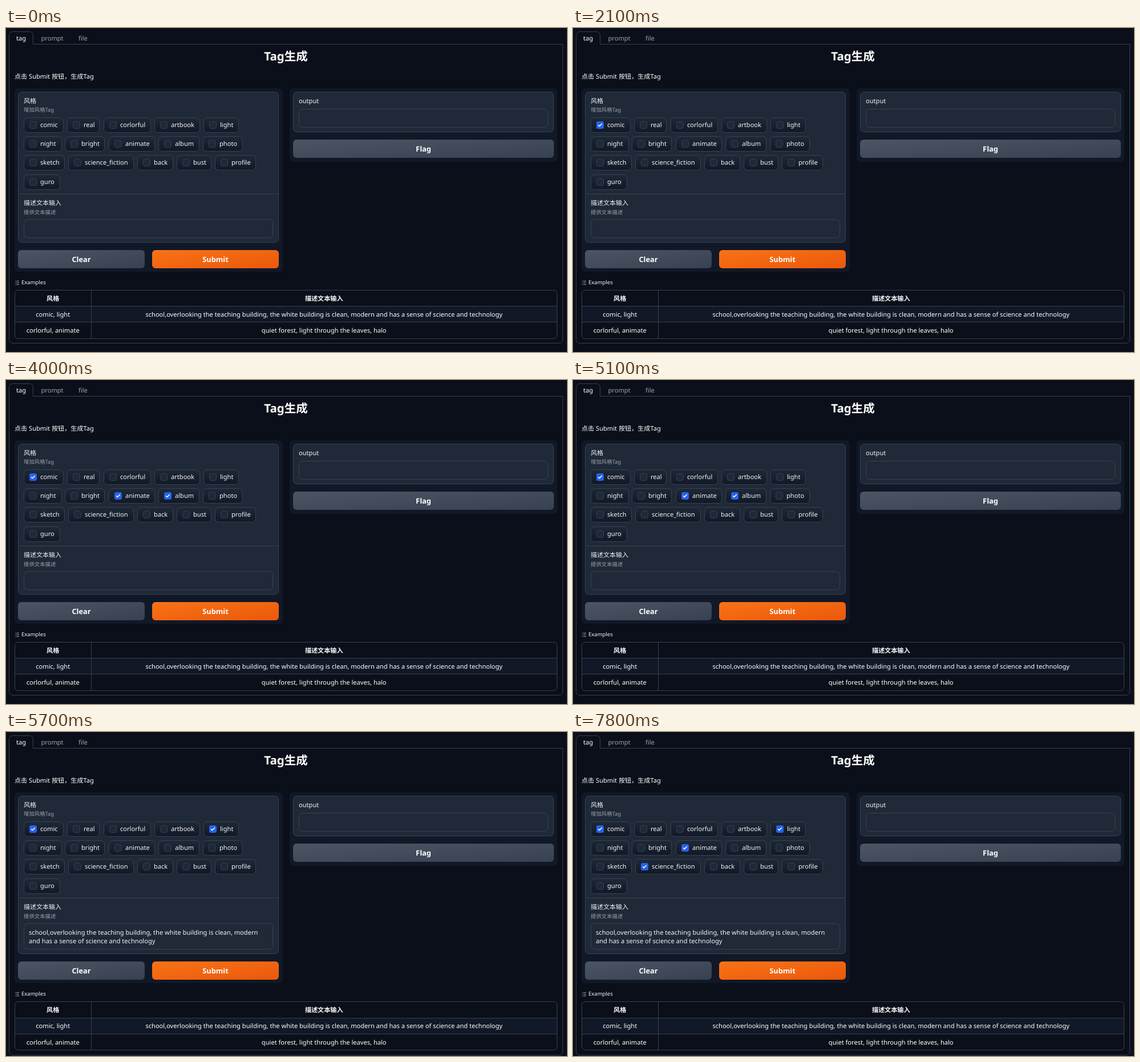
An HTML page with a canvas that plays this animation: 983x569 px, repeating every 8 s.

```html
<!DOCTYPE html>
<html lang="zh-CN">
<head>
<meta charset="utf-8">
<title>Tag生成</title>
<style>
html, body { margin: 0; width: 100%; height: 100%; overflow: hidden; background: #0b0f19; }
canvas { display: block; }
</style>
</head>
<body>
<canvas id="stage" width="983" height="569"></canvas>
<script>
const ctx = document.getElementById('stage').getContext('2d');
const LOOP = 8000;
const FAMILY = '"Noto Sans", "Noto Sans CJK SC", "Noto Sans CJK", sans-serif';
const BG = '#0b0f19', PANEL = '#111827', BLOCK = '#1f2937', LINE = '#374151';
const HOVER = '#4b5563', BLUE = '#2563eb', FOCUS = '#3b82f6';
const ORANGE = '#f97316', RUST = '#ea580c';
const WHITE = '#ffffff', TEXT = '#f3f4f6', MUTED = '#9ca3af';
const BODY = 11.1, SMALL = 9.4;
const SCENE1 = 'school,overlooking the teaching building, the white building is clean, modern';
const SCENE2 = 'and has a sense of science and technology';

// rows of [label, box x, chip width]
const CHIPS = [
  [['comic', 41, 70], ['real', 117, 57], ['corlorful', 181, 83], ['artbook', 270, 80], ['light', 356, 62]],
  [['night', 41, 67], ['bright', 113, 70], ['animate', 190, 81], ['album', 277, 72], ['photo', 355, 70]],
  [['sketch', 41, 72], ['science_fiction', 119, 115], ['back', 240, 63], ['bust', 309, 61], ['profile', 376, 72]],
  [['guro', 41, 64]]
];

// [time, label, box state]
const EVENTS = [
  [1200, 'corlorful', 'hover'], [1400, 'corlorful', ''], [1400, 'comic', 'hover'], [2100, 'comic', 'on'],
  [2300, 'real', 'hover'], [2400, 'real', ''], [2500, 'animate', 'hover'],
  [2900, 'animate', 'focus'], [3000, 'animate', 'on'],
  [3500, 'album', 'hover'], [4000, 'album', 'on'],
  [5700, 'animate', ''], [5700, 'album', ''], [5700, 'light', 'on'],
  [6100, 'animate', 'hover'], [6200, 'animate', ''],
  [6400, 'corlorful', 'hover'], [6500, 'corlorful', ''], [6500, 'animate', 'hover'],
  [7000, 'animate', 'on'], [7800, 'science_fiction', 'on']
];

function boxStates(t) {
  const states = {};
  for (const [at, label, state] of EVENTS) if (t >= at) states[label] = state;
  return states;
}

function text(str, x, y, { size = BODY, color = TEXT, weight = 400, align = 'left' } = {}) {
  ctx.font = `${weight} ${size}px ${FAMILY}`;
  ctx.textRendering = 'geometricPrecision';
  ctx.textAlign = align;
  ctx.fillStyle = color;
  ctx.fillText(str, x, y);
}

function fillBox(x, y, w, h, r, fill) {
  ctx.beginPath();
  ctx.roundRect(x, y, w, h, r);
  ctx.fillStyle = fill;
  ctx.fill();
}

// box with a one pixel border inside its edge
function frame(x, y, w, h, r, fill, stroke = LINE) {
  ctx.beginPath();
  ctx.roundRect(x + 0.5, y + 0.5, w - 1, h - 1, r);
  if (fill) {
    ctx.fillStyle = fill;
    ctx.fill();
  }
  ctx.strokeStyle = stroke;
  ctx.lineWidth = 1;
  ctx.stroke();
}

function rect(x, y, w, h, fill = LINE) {
  ctx.fillStyle = fill;
  ctx.fillRect(x, y, w, h);
}

// corner-to-corner gradient, like "to bottom right" in CSS
function diagonal(x, y, w, h, from, to) {
  const k = w * h / (w * w + h * h), cx = x + w / 2, cy = y + h / 2;
  const g = ctx.createLinearGradient(cx - h * k, cy - w * k, cx + h * k, cy + w * k);
  g.addColorStop(0, from);
  g.addColorStop(1, to);
  return g;
}

function button(label, x, y, w, from, to) {
  const h = 32;
  fillBox(x, y, w, h, 6, diagonal(x, y, w, h, from, to));
  text(label, x + w / 2, y + 21, { size: 12.8, weight: 600, color: WHITE, align: 'center' });
}

function checkbox(x, y, state) {
  if (state !== 'on') {
    frame(x, y, 13, 13, 3, BLOCK, state === 'hover' ? HOVER : state === 'focus' ? FOCUS : LINE);
    return;
  }
  fillBox(x, y, 13, 13, 3, BLUE);
  const k = 13 / 16;
  ctx.beginPath();
  ctx.moveTo(x + 4.5 * k, y + 8.5 * k);
  ctx.lineTo(x + 6.5 * k, y + 10.5 * k);
  ctx.lineTo(x + 11.5 * k, y + 5.5 * k);
  ctx.strokeStyle = WHITE;
  ctx.lineWidth = 2 * k;
  ctx.lineCap = ctx.lineJoin = 'round';
  ctx.stroke();
}

function chips(states) {
  CHIPS.forEach((row, i) => {
    const y = 157 + Math.round(i * 33.2);
    const g = ctx.createLinearGradient(0, y, 0, y + 27);
    g.addColorStop(0, BLOCK);
    g.addColorStop(1, PANEL);
    for (const [label, x, w] of row) {
      frame(x - 10, y, w, 27, 6, g);
      checkbox(x, y + 7, states[label]);
      text(label, x + 19, y + 17);
    }
  });
}

function page(bottom) {
  rect(0, 0, 983, 569, BG);
  rect(48, 28, 928, 1);
  ctx.beginPath();
  ctx.moveTo(975.5, 28.5);
  ctx.lineTo(975.5, bottom - 5.5);
  ctx.arcTo(975.5, bottom + 0.5, 969.5, bottom + 0.5, 6);
  ctx.lineTo(11.5, bottom + 0.5);
  ctx.arcTo(5.5, bottom + 0.5, 5.5, bottom - 5.5, 6);
  ctx.lineTo(5.5, 12.5);
  ctx.arcTo(5.5, 6.5, 11.5, 6.5, 6);
  ctx.lineTo(41.5, 6.5);
  ctx.arcTo(47.5, 6.5, 47.5, 12.5, 6);
  ctx.lineTo(47.5, 28.5);
  ctx.strokeStyle = LINE;
  ctx.lineWidth = 1;
  ctx.stroke();
  text('tag', 18, 22, { color: WHITE });
  text('prompt', 61.5, 22, { color: MUTED });
  text('file', 127, 22, { color: MUTED });
  text('Tag生成', 490.5, 57, { size: 20.5, weight: 700, color: WHITE, align: 'center' });
  text('点击 Submit 按钮，生成Tag', 15, 88.5, { color: WHITE });
}

function outputPanel() {
  fillBox(497, 106, 469, 129, 6, PANEL);
  frame(503, 112, 457, 71, 6, BLOCK);
  text('output', 513, 132);
  frame(513, 142, 437, 33, 6, BLOCK);
  button('Flag', 503, 196, 457, '#4b5563', '#374151');
}

function inputPanel(t, down, filled) {
  fillBox(15, 106, 470, down(428) - 106, 6, PANEL);
  frame(21, 112, 457, down(377) - 112, 6, BLOCK);
  rect(22, 291, 455, 1);
  text('风格', 31, 132);
  text('增加风格Tag', 31, 147, { size: SMALL, color: MUTED });
  chips(boxStates(t));
  text('描述文本输入', 31, 311, { size: 11 });
  text('提供文本描述', 31, 326.5, { size: SMALL, color: MUTED });
  frame(31, 336, 437, down(369) - 336, 6, BLOCK);
  if (filled) {
    text(SCENE1, 40, 356);
    text(SCENE2, 40, 371);
  }
  const y = down(389.6);
  const passing = t >= 5000 && t < 5100;
  button('Clear', 21, y, 222, '#4b5563', '#374151');
  button('Submit', 256, y, 222, ORANGE, passing ? ORANGE : RUST);
}

function examples(t, down) {
  const top = down(460), row1 = down(488.3), row2 = down(516.4), bottom = down(545);
  const icon = down(444);
  for (let i = 0; i < 3; i++) {
    rect(16, icon + i * 3, 1, 1, MUTED);
    rect(18, icon + i * 3, 5, 1, MUTED);
  }
  text('Examples', 27, down(450), { size: 9.5 });

  const hovered = t >= 5200 && t < 5700;
  rect(15, row1, 951, row2 - row1, hovered ? LINE : PANEL);
  frame(15, top, 951, bottom - top + 1, 6);
  rect(15, row1, 951, 1);
  rect(15, row2, 951, 1);
  rect(149, top, 1, bottom - top);

  const row = (a, b, y, weight) => {
    const style = { weight, color: WHITE, align: 'center' };
    text(a, 82.2, y, style);
    text(b, 557.2, y, style);
  };
  row('风格', '描述文本输入', down(479), 700);
  row('comic, light', SCENE1 + ' ' + SCENE2, down(507), 400);
  row('corlorful, animate', 'quiet forest, light through the leaves, halo', down(535.2), 400);
}

function draw(t) {
  const filled = t >= 5700;
  const down = y => Math.round(y + (filled ? 13.4 : 0));
  page(down(553.3));
  outputPanel();
  inputPanel(t, down, filled);
  examples(t, down);
}

const start = performance.now();
function tick() {
  draw((performance.now() - start) % LOOP);
  requestAnimationFrame(tick);
}
tick();
</script>
</body>
</html>
```
